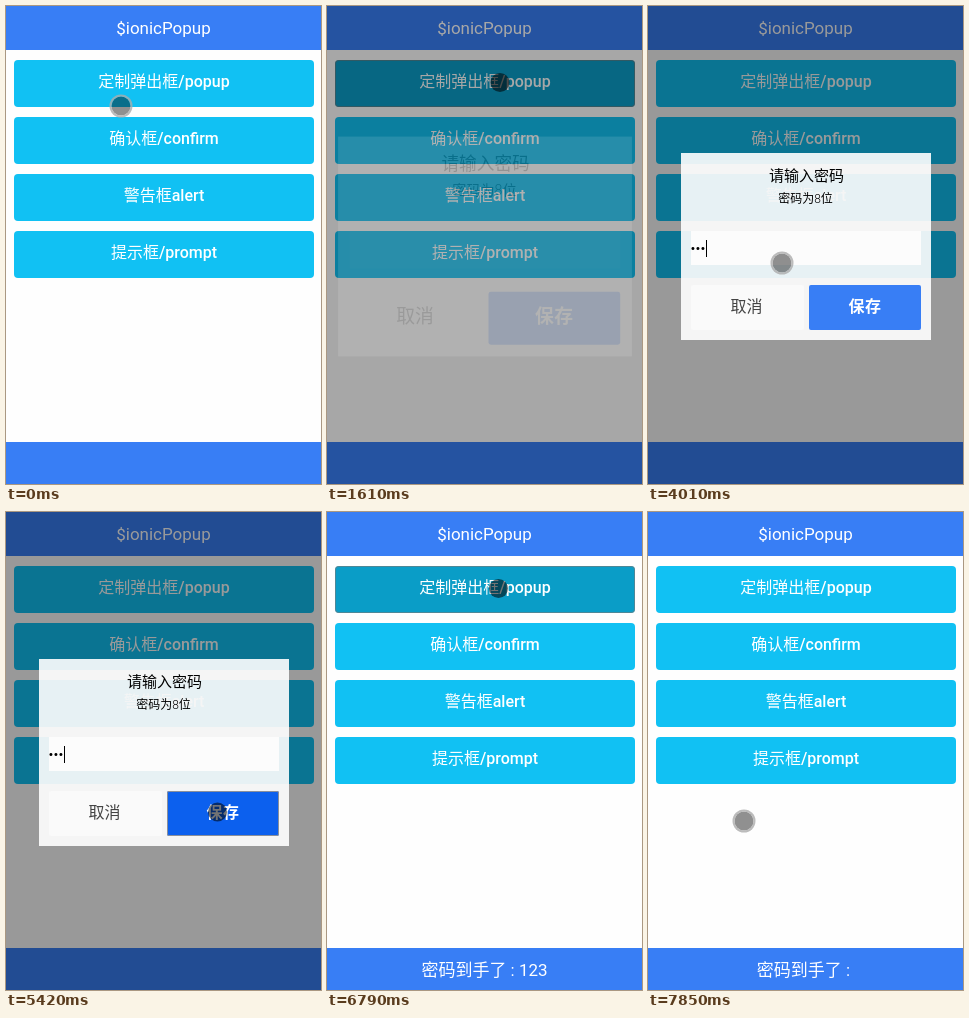
These frames come from a looping animation (315 px wide and 478 px high, 8000 ms). An HTML page:

```html
<!DOCTYPE html>
<html lang="zh-CN">
<head>
<meta charset="utf-8">
<title>$ionicPopup</title>
<style>
html, body { margin: 0; width: 100%; height: 100%; overflow: hidden; background: #fff; }
#stage {
  position: relative; width: 315px; height: 478px; overflow: hidden; background: #fefefe;
  font: 500 16px Roboto, "Noto Sans CJK SC", "Noto Sans CJK", sans-serif;
  color: #fff; text-align: center; white-space: pre;
}
#stage div { position: absolute; box-sizing: border-box; }
.bar { left: 0; width: 315px; background: #387ef5; font-size: 17px; font-weight: 400; line-height: 44px; }
.bar.top { top: 0; height: 44px; }
.bar.foot { top: 436px; height: 42px; }
.thin { font-weight: 300; }
.item { left: 8px; width: 300px; height: 47px; line-height: 43px; border-radius: 4px; background: #11c1f3; }
.item.on { background: #0a9dc7; box-shadow: inset 0 0 0 1px rgba(120,120,120,.6); }
#shade { left: 0; top: 0; width: 315px; height: 478px; background: #000; }
#popup { left: 33px; top: 147px; width: 250px; height: 187px; background: rgba(255,255,255,.9); color: #000; font-weight: 300; }
.title { left: 0; top: 11px; width: 251px; font-size: 15px; line-height: 24px; }
.sub { left: 0; top: 37px; width: 249px; font-size: 12px; line-height: 18px; }
.field { left: 10px; top: 78px; width: 230px; height: 34px; background: #fcfcfc; }
#dots { left: 0; top: 1px; line-height: 33px; font-family: "Liberation Sans", Arial, sans-serif; font-size: 11px; letter-spacing: 1.15px; }
#caret { top: 9px; width: 1px; height: 17px; background: #000; }
.btn { top: 132px; height: 45px; line-height: 43px; border-radius: 2px; }
#cancel { left: 10px; width: 113px; background: #fafafa; color: #444; padding-right: 2px; }
#cancel.on { background: #e5e5e5; }
#save { left: 128px; width: 112px; background: #387ef5; color: #fff; font-weight: 700; letter-spacing: .5px; }
#save.on { background: #0c60ee; box-shadow: inset 0 0 0 1px #8a8f9a; }
#touch { left: -11.5px; top: -11.5px; width: 23px; height: 23px; border-radius: 50%;
  border: 2px solid rgba(172,172,172,.8); background: rgba(0,0,0,.43); background-clip: padding-box; }
#touch.on { border-color: transparent; background-color: rgba(0,0,0,.55); }
</style>
</head>
<body>
<div id="stage">
  <div class="bar top">$ionicPopup</div>
  <div class="item" id="first" style="top:54px"><span class="thin">定制弹出框</span>/popup</div>
  <div class="item" style="top:111px"><span class="thin">确认框</span>/confirm</div>
  <div class="item" style="top:168px"><span class="thin">警告框</span>alert</div>
  <div class="item" style="top:225px"><span class="thin">提示框</span>/prompt</div>
  <div class="bar foot"><span class="thin" id="label"></span><span id="value"></span></div>
  <div id="shade"></div>
  <div id="popup">
    <div class="title">请输入密码</div>
    <div class="sub">密码为8位</div>
    <div class="field"><div id="dots"></div><div id="caret"></div></div>
    <div class="btn" id="cancel">取消</div>
    <div class="btn" id="save">保存</div>
  </div>
  <div id="touch"></div>
</div>
<script>
const LOOP = 8000, FRAME = 135.4, FADE = 150, TAP = 130;
const KEY_GAP = 185, BLINK = 545;
const $ = id => document.getElementById(id);
const clamp = (v, lo = 0, hi = 1) => Math.min(hi, Math.max(lo, v));
const within = (t, from, to) => t >= from && t < to;

const home = [114.5, 99.5];
const glides = [
  { from: 0, to: 660, via: [150, 404], end: [172.5, 76] },
  { from: 1880, to: 2420, via: [185, 300], end: [216.5, 309.5] },
  { from: 2430, to: 2825, via: [180, 285], end: [133.5, 256.5] },
  { from: 4730, to: 5260, via: [165, 290], end: [211, 299.5] },
  { from: 6120, to: 6610, via: [180, 180], end: [171, 76] },
  { from: 6895, to: 7295, via: [188, 210], end: [95.5, 308.5] }
];
const visits = [
  { open: 1591, close: 5470, button: "save", focus: 2840, typing: 3630, text: "123" },
  { open: 6884, close: 7635, button: "cancel", focus: Infinity, typing: Infinity, text: "" }
];

// The screen is refreshed in coarse steps.
const snap = t => 120 + FRAME * Math.floor((t - 120) / FRAME);

function touchAt(t) {
  return glides.reduce((start, { from, to, via, end }) => {
    const p = clamp((t - from) / (to - from)), q = 1 - p;
    return start.map((s, i) => q * q * s + 2 * q * p * via[i] + p * p * end[i]);
  }, home);
}

function drawPopup(t, { open, close }) {
  const shown = clamp((t - open) / FADE), gone = clamp((t - close) / FADE);
  const scale = 1.2 - .2 * shown - .2 * gone;
  $("popup").style.transform = shown === 1 && !gone ? "none" : `scale(${scale})`;
  $("popup").style.opacity = shown * (1 - gone);
  $("shade").style.opacity = .4 * clamp(shown * 7) * (1 - gone);
}

function drawField(t, { close, focus, typing }) {
  const count = clamp(Math.floor((t - typing) / KEY_GAP) + 1, 0, 3);
  const lastInput = count ? typing + KEY_GAP * (count - 1) : focus;
  const lit = within(t, focus, close) && (t - lastInput) % (2 * BLINK) < BLINK;
  $("dots").textContent = "•".repeat(count);
  $("caret").style.left = count * 5 + "px";
  $("caret").style.opacity = lit ? 1 : 0;
}

function drawPresses(t, { open, close, button }) {
  const press = (id, on) => $(id).classList.toggle("on", on);
  press("touch", within(t, open - TAP, open + 100) || within(t, close - TAP, close));
  press("first", within(t, open - TAP, open + 200));
  for (const id of ["save", "cancel"])
    press(id, id === button && within(t, close - TAP, close + FADE));
}

function draw(time) {
  const t = snap(time);
  const visit = visits.find(v => t < v.close + FADE) || visits.at(-1);
  const result = visits.findLast(v => t >= v.close);
  const [x, y] = touchAt(t);
  $("touch").style.transform = `translate(${x}px, ${y}px)`;
  $("label").textContent = result ? "密码到手了" : "";
  $("value").textContent = result ? " : " + result.text : "";
  drawPopup(t, visit);
  drawField(time, visit);
  drawPresses(t, visit);
}

const start = performance.now();
function tick() {
  draw((performance.now() - start) % LOOP);
  requestAnimationFrame(tick);
}
tick();
</script>
</body>
</html>
```
